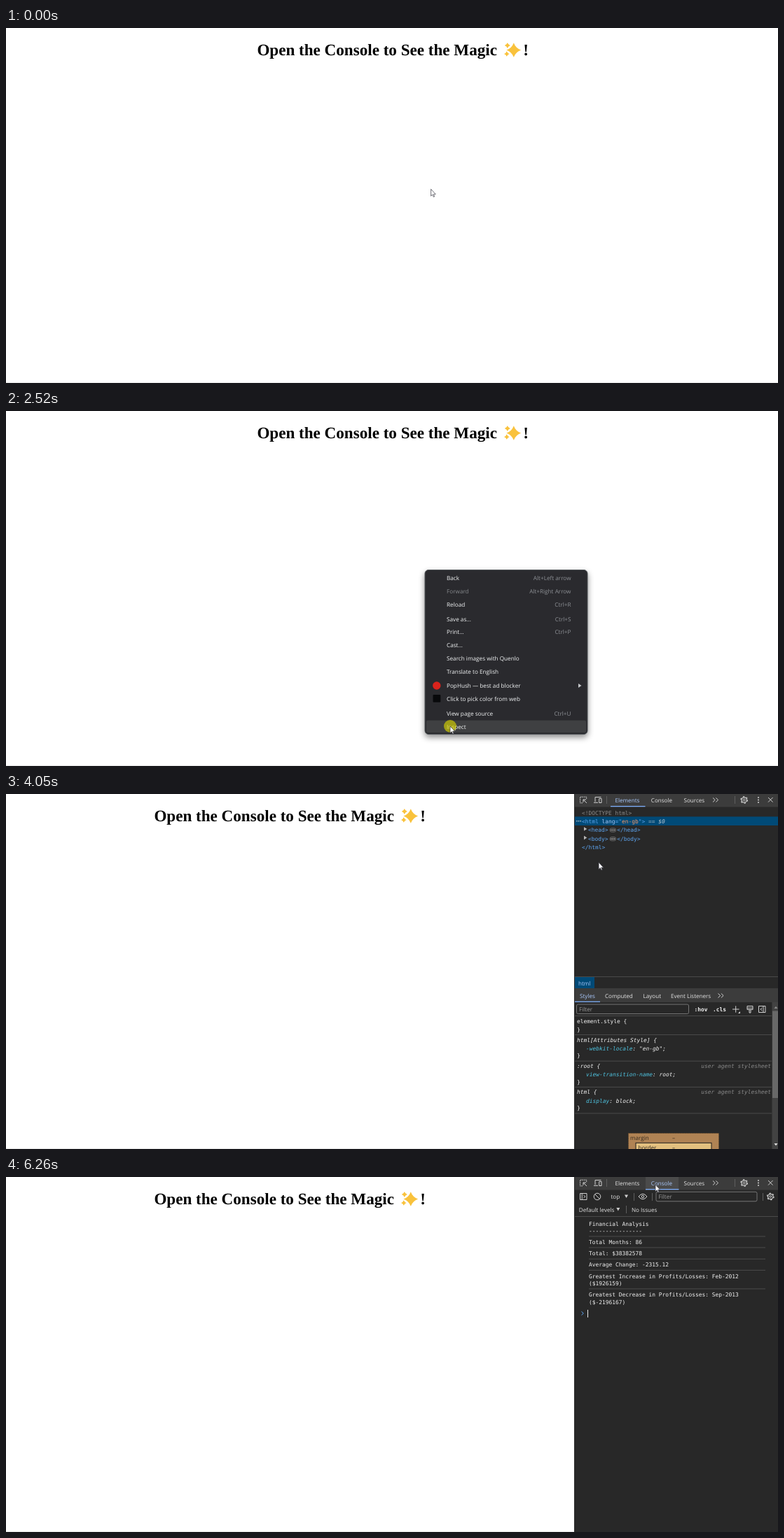
These frames come from a looping animation (1102x508 px, 6640 ms). An HTML page:

```html
<!DOCTYPE html>
<html lang="en">
<head>
<meta charset="utf-8">
<title>Console demo</title>
<style>
html, body { margin: 0; width: 100%; height: 100%; overflow: hidden; background: #fff; }
svg { display: block; width: 1102px; height: 508px; }
text { white-space: pre; text-rendering: geometricPrecision; }
.serif { font: bold 23.1px "Liberation Serif", "Times New Roman", serif; }
.menu { font: 8.2px "Open Sans", "Noto Sans", sans-serif; }
.ui { font: 8.1px "Open Sans", "Noto Sans", sans-serif; }
.tip { font: 8.6px "Open Sans", "Noto Sans", sans-serif; }
.mono { font: 7.9px "DejaVu Sans Mono", "Noto Sans Mono", monospace; }
.it { font-style: italic; }
.b { font-weight: bold; }
.icon { fill: none; stroke: #d0d0d0; stroke-width: 1; }
</style>
</head>
<body>
<svg id="stage" viewBox="0 0 1102 508"></svg>
<script>
const LOOP = 6640, STEP = 66.4;
const esc = s => s.replace(/&/g, "&amp;").replace(/</g, "&lt;");
const text = (cls, x, y, s, fill, extra = "") =>
  `<text class="${cls}" x="${x}" y="${y}" fill="${fill}" ${extra}>${esc(s)}</text>`;
const rich = (cls, x, y, parts) => `<text class="${cls}" x="${x}" y="${y}">` +
  parts.map(([fill, s, c = ""]) => `<tspan class="${c}" fill="${fill}">${esc(s)}</tspan>`).join("") + "</text>";
const rect = (x, y, w, h, fill, extra = "") =>
  `<rect x="${x}" y="${y}" width="${w}" height="${h}" fill="${fill}" ${extra}/>`;
const icon = (d, extra = "") => `<path class="icon" d="${d}" ${extra}/>`;
const solid = (d, fill) => `<path d="${d}" fill="${fill}"/>`;
const group = (id, body, extra = "") => `<g id="${id}" ${extra}>${body}</g>`;
const END = 'text-anchor="end"';

// Heading with sparkles
const star = (x, y, r) => {
  const q = r * 0.27;
  return solid(`M${x} ${y - r}Q${x + q} ${y - q} ${x + r} ${y}Q${x + q} ${y + q} ${x} ${y + r}` +
    `Q${x - q} ${y + q} ${x - r} ${y}Q${x - q} ${y - q} ${x} ${y - r}Z`, "#f9c23c");
};
const heading = text("serif", 358.4, 39.3, "Open the Console to See the Magic", "#000") +
  star(724.8, 31.5, 10.3) + star(715.8, 25, 4) + star(714.8, 37, 3.8) +
  text("serif", 738.2, 39.3, "!", "#000");

// Context menu
const items = [
  [239, "Back", "Alt+Left arrow"], [257.8, "Forward", "Alt+Right Arrow"], [276.5, "Reload", "Ctrl+R"],
  [297.5, "Save as...", "Ctrl+S"], [316, "Print...", "Ctrl+P"], [335, "Cast..."],
  [353.5, "Search images with Quenlo"], [372.5, "Translate to English"],
  [393, "PopHush — best ad blocker"], [411.7, "Click to pick color from web"],
  [433, "View page source", "Ctrl+U"], [451.5, "Inspect"]
];
const menu = rect(598, 227.5, 232, 235, "#292a2d", 'rx="5" stroke="#4c5053" filter="url(#shade)"') +
  rect(600, 0, 228, 17.5, "#3f4042", 'id="hover" rx="2"') +
  items.map(([y, label, key = ""]) =>
    text("menu", 629, y + 3, label, label === "Forward" ? "#85888c" : "#f1f3f4") +
    text("menu", 806.5, y + 3, key, "#8d9095", END)).join("") +
  '<circle cx="614.8" cy="393" r="5.7" fill="#d9231c"/>' +
  rect(609.5, 406, 10.8, 10.8, "#08090b", 'rx="1"') +
  solid("M817 390L821.5 393L817 396Z", "#c4c6c9");

// Developer tools
const LABEL = "#e3e3e3", ACTIVE = "#a8c7fa";
const vline = (x, y1, y2) => icon(`M${x} ${y1}V${y2}`, 'style="stroke:#5e5e5e"');
const hline = (y, x1 = 812, x2 = 1093) => icon(`M${x1} ${y}H${x2}`, 'style="stroke:#4a4a4a"');
const chevrons = (x, y) => icon(`M${x} ${y - 3}l3.2 3l-3.2 3m4.4 -6l3.2 3l-3.2 3`);
const gear = (x, y) => `<g class="icon"><circle cx="${x}" cy="${y}" r="3.7" stroke-width="1.2"/>` +
  `<circle cx="${x}" cy="${y}" r="4.8" stroke-width="1.2" stroke-dasharray="2.3 2.73"/>` +
  `<circle cx="${x}" cy="${y}" r="1.4"/></g>`;
const down = (x, y) => solid(`M${x} ${y}h5l-2.5 4.4Z`, "#d0d0d0");
const field = (x, y, w) => rect(x, y, w, 13.5, "#282828", 'rx="2" stroke="#757575"') +
  text("ui", x + 3.5, y + 10, "Filter", "#9a9a9a");

const toolbar = rect(812, 0, 290, 18.5, "#3c3c3c") +
  rect(863, 0, 50, 18.5, "#4b4b4b", 'id="tabHover"') +
  icon("M823 12.8H819.5V4.2H828.7V7.5", 'stroke-dasharray="1.6 .9"') +
  icon("M829 13L824 8M824 11.8V8H828") +
  icon("M841 11V4.5H849.5M839 12.3H845M846.7 6.5H850V12.5H846.7Z") +
  vline(857.5, 3, 14) + vline(1040.5, 3, 14) +
  text("ui", 869.5, 11.5, "Elements", LABEL, 'id="tabA"') +
  text("ui", 920.8, 11.5, "Console", LABEL, 'id="tabB"') +
  text("ui", 967.5, 11.5, "Sources", LABEL) + chevrons(1009, 8.5) + gear(1053.7, 8.5) +
  [5, 8.5, 12].map(y => `<circle cx="1074" cy="${y}" r="1" fill="#d0d0d0"/>`).join("") +
  icon("M1088 5l6.6 6.6m0 -6.6l-6.6 6.6") +
  rect(863, 17, 49, 1.3, "#7cacf8", 'id="underline"');

const TAG = "#5ea5f0", ATTR = "#a8c7fa", VAL = "#fe9a68", FG = "#f0f0f0", PROP = "#4fc3e0", DIM = "#8a8a8a";
const branch = (name, y) => solid(`M825 ${y - 7}l4.3 2.8l-4.3 2.8Z`, "#b5b5b5") +
  text("mono", 831, y, `<${name}>`, TAG) +
  rect(862, y - 5.3, 8.6, 5.4, "#3c3c3c", 'rx="2.5" stroke="#777" stroke-width=".7"') +
  [864, 866.3, 868.6].map(x => `<circle cx="${x}" cy="${y - 2.6}" r=".7" fill="#ddd"/>`).join("") +
  text("mono", 872.3, y, `</${name}>`, TAG);
const tree = text("mono", 822, 29.5, "<!DOCTYPE html>", DIM) +
  rect(812, 32.4, 290, 12.6, "#004a77") +
  [815, 817.6, 820.2].map(x => `<circle cx="${x}" cy="38.7" r=".8" fill="#ddd"/>`).join("") +
  rich("mono", 822, 41.6, [[TAG, "<html "], [ATTR, "lang"], [TAG, '="'], [VAL, "en-gb"], [TAG, '">'],
    ["#9fb2c2", " == "], ["#b7c6d2", "$0", "it"]]) +
  branch("head", 54.2) + branch("body", 66.8) + text("mono", 822, 79, "</html>", TAG) +
  hline(261.5, 812, 1102) + rect(812, 262, 28, 16, "#004a77") + text("ui", 817, 273.5, "html", ATTR);

const rule = (y, selector, prop, value) => text("mono it", 815, y, selector + " {", FG) +
  rich("mono it", 828, y + 12.2, [[PROP, prop], [FG, ": " + value + ";"]]) +
  text("mono", 815, y + 22.8, "}", FG) + hline(y + 27.6);
const agent = y => text("mono it", 1092, y, "user agent stylesheet", DIM, END);
const styles = rect(812, 278, 290, 20, "#3c3c3c") +
  [[819, "Styles"], [855, "Computed"], [909.5, "Layout"], [949, "Event Listeners"]]
    .map(([x, s], i) => text("ui", x, 291.5, s, i ? LABEL : ACTIVE)).join("") +
  chevrons(1016.5, 288.5) + rect(812, 296.6, 36, 1.3, "#7cacf8") + field(814.5, 301, 160) +
  text("mono b", 982.5, 310.7, ":hov", FG) + text("mono b", 1009, 310.7, ".cls", FG) +
  icon("M1037 308H1046.5M1041.7 303.3V312.7") + solid("M1048 311v3h-3Z", "#d0d0d0") +
  icon("M1058 303.5H1066V308.5H1058ZM1058 306.3H1066M1061 308.5V313H1063V308.5") +
  icon("M1074.5 303.5H1084V312.5H1074.5ZM1081 303.5V312.5M1079.3 306L1077 308L1079.3 310") +
  hline(317.5) + text("mono", 815, 327.5, "element.style {", FG) + text("mono", 815, 339.8, "}", FG) + hline(344.5) +
  rule(354.6, "html[Attributes Style]", "-webkit-locale", '"en-gb"') +
  rule(391.8, ":root", "view-transition-name", "root") + agent(391.8) +
  rule(429.4, "html", "display", "block") + agent(429.4) +
  rect(888.5, 485.5, 129, 24, "#b08354", 'stroke="#6b4e2f" stroke-dasharray="2 1.5"') +
  text("ui", 891, 495, "margin", "#33291e") + text("ui", 951, 495, "–", "#33291e") +
  rect(899, 499.3, 108, 12, "#e3c07f", 'stroke="#1e1e1e"') +
  text("ui", 902.5, 509, "border", "#33291e") + text("ui", 951, 509, "–", "#33291e") +
  rect(1093.5, 298, 8.5, 210, "#424242") + rect(1094, 310.5, 8, 124.5, "#686868") +
  solid("M1096.5 307h5l-2.5 -3.2Z", "#8a8a8a") + solid("M1096.5 500h5l-2.5 3.2Z", "#e0e0e0");

const logs = [
  [69.6, "Financial Analysis"], [80, "----------------"], [96, "Total Months: 86"], [112, "Total: $38382578"],
  [128.2, "Average Change: -2315.12"], [144.6, "Greatest Increase in Profits/Losses: Feb-2012"], [155, "($1926159)"],
  [171, "Greatest Decrease in Profits/Losses: Sep-2013"], [181.5, "($-2196167)"]
];
const consolePane = icon("M819.5 23.5H829V32.5H819.5ZM822.2 23.5V32.5M824.5 26L826.8 28L824.5 30") +
  '<circle class="icon" cx="844" cy="28" r="4.8"/>' + icon("M840.6 24.6l6.8 6.8") +
  text("ui", 863.5, 31, "top", LABEL) + down(883, 25.6) + vline(896.5, 23, 34) +
  icon("M903 28Q909 20.4 915 28Q909 35.6 903 28Z") + '<circle class="icon" cx="909" cy="28" r="1.7"/>' +
  vline(922.5, 23, 34) + field(928, 21.3, 144) + vline(1080.5, 23, 34) + gear(1091.3, 28) +
  text("ui", 817.8, 50, "Default levels", LABEL) + down(871.3, 44) + vline(885.5, 41, 52) +
  text("ui", 893, 50, "No Issues", LABEL) + hline(56.5, 812, 1102) +
  logs.map(([y, s]) => text("mono", 832, y, s, FG)).join("") +
  [85, 101, 117.3, 133.4, 160].map(y => hline(y, 832, 1084)).join("") +
  icon("M821.5 192.5l2.8 2.6l-2.8 2.6", 'style="stroke:#5ea5f0"') +
  rect(830, 190, 1, 11, "#e8e8e8", 'id="caret"');

const overlay = rect(0, 0, 812, 60.3, "#6fa8dc", 'opacity=".66"') +
  '<g filter="url(#soft)">' + rect(1, 66, 92.5, 21, "#fff", 'rx="2"') + solid("M7.5 66.5L14 60.5L20.5 66.5Z", "#fff") + "</g>" +
  text("tip b", 7.5, 79.8, "html", "#881280") + text("tip", 35.3, 79.8, "1128 × 85.28", "#5a5a5a");

const stage = document.getElementById("stage");
stage.innerHTML = `<defs>
  <filter id="shade" x="-10%" y="-10%" width="120%" height="120%"><feDropShadow dx="0" dy="4" stdDeviation="4.5" flood-opacity=".45"/></filter>
  <filter id="soft" x="-10%" y="-30%" width="120%" height="170%"><feDropShadow dx="0" dy="1" stdDeviation="1.6" flood-opacity=".4"/></filter>
  </defs>` + rect(0, 0, 1102, 508, "#fff") + rect(0, 507, 1102, 1, "#e6e6e6") +
  group("heading", heading) + group("overlay", overlay) +
  group("panel", rect(811, 0, 291, 508, "#282828") + group("toolbar", toolbar) +
    group("tree", tree) + group("styles", styles) + group("log", consolePane)) +
  group("menu", menu) +
  '<circle id="click" r="9" fill="#d9d400" opacity=".64"/>' +
  '<path id="cursor" d="M0 0V9.8L2.2 7.8L3.7 11.2L5.1 10.6L3.7 7.3H6.7Z" fill="#fff" stroke="#34343e" stroke-width=".7"/>';
const el = {};
stage.querySelectorAll("[id]").forEach(n => el[n.id] = n);

// Cursor keys: time, x, y
const path = [
  [0, 606.6, 230.6], [66, 603, 229.5], [133, 597.5, 227.5], [1195, 597.5, 227.5], [1261, 603, 232],
  [1328, 612, 251], [1394, 622.5, 270], [1660, 632, 375], [1860, 634, 443], [1926, 634, 447],
  [2125, 634, 451], [2590, 634, 451], [2656, 637, 450], [3452, 637, 450], [3586, 646, 420],
  [3652, 663, 372], [3852, 772, 212], [4050, 846, 98], [4183, 874, 48], [4249, 882.5, 33.5],
  [4316, 893, 20.5], [4382, 905, 16], [4581, 927, 11]
];
function cursorAt(t) {
  const i = path.findIndex(k => k[0] > t);
  if (i < 0) return path[path.length - 1].slice(1);
  if (i === 0) return path[0].slice(1);
  const [a, b] = [path[i - 1], path[i]], f = (t - a[0]) / (b[0] - a[0]);
  return [a[1] + (b[1] - a[1]) * f, a[2] + (b[2] - a[2]) * f];
}
const show = (name, on) => el[name].setAttribute("visibility", on ? "visible" : "hidden");
const within = (t, a, b) => t >= a && t < b;

function draw(t) {
  const snap = Math.floor((t + 9) / STEP) * STEP;
  const [x, y] = cursorAt(snap);
  el.cursor.setAttribute("transform", `translate(${x} ${y})`);

  const open = t >= 3050, onConsole = t >= 4980;
  el.heading.setAttribute("transform", `translate(${open ? -147 : 0} 0)`);
  show("panel", open);
  show("toolbar", t >= 3180);
  show("tree", within(t, 3180, 4980));
  show("styles", within(t, 3320, 4980));
  show("log", t >= 5110);
  show("caret", t >= 5110 && !within(t, 5650, 6260));
  show("overlay", within(t, 4180, 4320));

  const menuOpen = within(t, 600, 2650), last = cursorAt(snap - STEP)[1];
  const row = items.find(r => Math.abs(r[0] - last) < 9.4);
  show("menu", menuOpen);
  show("hover", menuOpen && row && row[1] !== "Forward");
  if (row) el.hover.setAttribute("y", row[0] - 8.7);

  const clicking = within(t, 480, 670) || within(t, 2520, 2650) || within(t, 4980, 5110);
  show("click", clicking);
  el.click.setAttribute("cx", x);
  el.click.setAttribute("cy", y);

  const overB = x > 913;
  show("tabHover", open && y < 18);
  el.tabHover.setAttribute("x", overB ? 913 : 863);
  el.tabHover.setAttribute("width", overB ? 47 : 50);
  el.underline.setAttribute("x", t < 4980 ? 863 : t < 5040 ? 893 : 913);
  el.underline.setAttribute("width", onConsole ? 47.5 : 49.5);
  el.tabA.setAttribute("fill", onConsole ? LABEL : ACTIVE);
  el.tabB.setAttribute("fill", onConsole ? ACTIVE : LABEL);
}
const start = performance.now();
function tick() {
  draw((performance.now() - start) % LOOP);
  requestAnimationFrame(tick);
}
tick();
</script>
</body>
</html>
```
